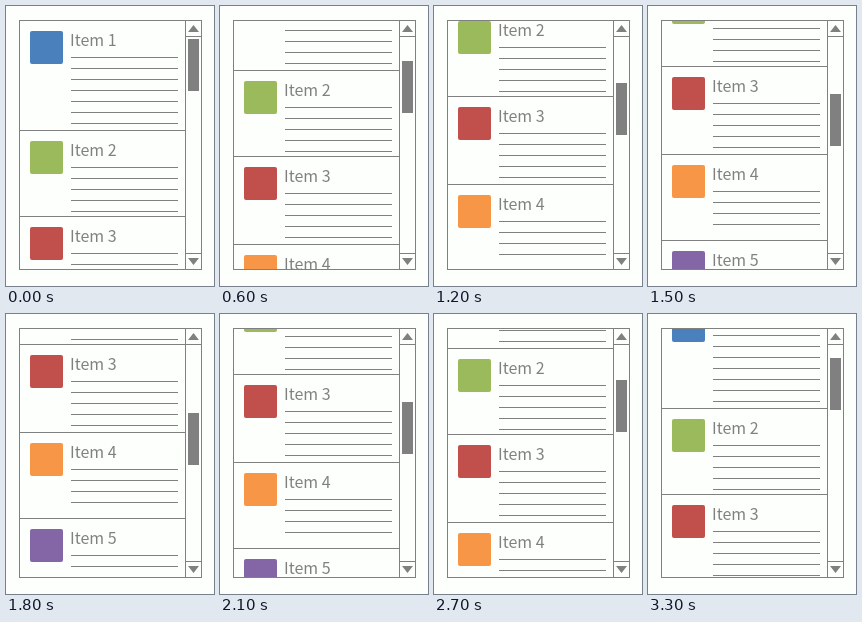
An HTML page for the animation above (3600 ms loop, 208 by 280 pixels).

```html
<!DOCTYPE html>
<html lang="en">
<head>
<meta charset="utf-8">
<title>Scrolling list</title>
<style>
  html, body { margin: 0; width: 100%; height: 100%; overflow: hidden; background: #fdfffc; }
  svg { display: block; width: 208px; height: 280px; }
  text { font: 16px "Noto Sans CJK JP", "Noto Sans CJK", "Noto Sans", sans-serif; fill: #808080; }
  .ink { fill: #808080; }
  .frame { fill: none; stroke: #808080; shape-rendering: crispEdges; }
</style>
</head>
<body>
<svg viewBox="0 0 208 280">
  <clipPath id="view"><rect x="14" y="15" width="165" height="248"/></clipPath>
  <g clip-path="url(#view)"><g id="list"></g></g>
  <path class="frame" d="M13.5 14.5H195.5V263.5H13.5ZM179.5 14V263M179 30.5H195M179 247.5H195"/>
  <path class="ink" d="M187.5 19L193 26H182ZM182 252H193L187.5 259Z"/>
  <rect id="thumb" class="ink" x="182" y="33" width="11" height="52"/>
</svg>
<script>
const items = [
  { color: '#4a80bc', height: 110, lines: 7 },
  { color: '#9bba5b', height: 86, lines: 5 },
  { color: '#c1504d', height: 88, lines: 5 },
  { color: '#f79646', height: 86, lines: 4 },
  { color: '#8465a6', height: 110, lines: 7 }
];
const list = document.getElementById('list');
const thumb = document.getElementById('thumb');

function add(tag, attrs, label = '') {
  const node = document.createElementNS('http://www.w3.org/2000/svg', tag);
  for (const [key, value] of Object.entries(attrs)) node.setAttribute(key, value);
  node.textContent = label;
  list.append(node);
}

function rule(x, y, width) {
  add('rect', { class: 'ink', x, y, width, height: 1 });
}

let itemY = 14;
items.forEach(({ color, height, lines }, i) => {
  rule(14, itemY, 165);
  add('rect', { x: 24, y: itemY + 11, width: 33, height: 33, rx: 2, fill: color });
  add('text', { x: 64, y: itemY + 26 }, `Item ${i + 1}`);
  for (let n = 0; n < lines; n++) rule(65, itemY + 37 + 11 * n, 107);
  itemY += height;
});

// Six jumps down, six jumps back up.
const STEPS = 6, STEP_MS = 300;

function jump(node, distance) {
  const frames = Array.from({ length: 2 * STEPS + 1 }, (_, i) => ({
    transform: `translateY(${distance * (STEPS - Math.abs(STEPS - i))}px)`,
    easing: 'step-end'
  }));
  node.animate(frames, { duration: 2 * STEPS * STEP_MS, iterations: Infinity });
}

jump(list, -30);
jump(thumb, 11);
</script>
</body>
</html>
```
